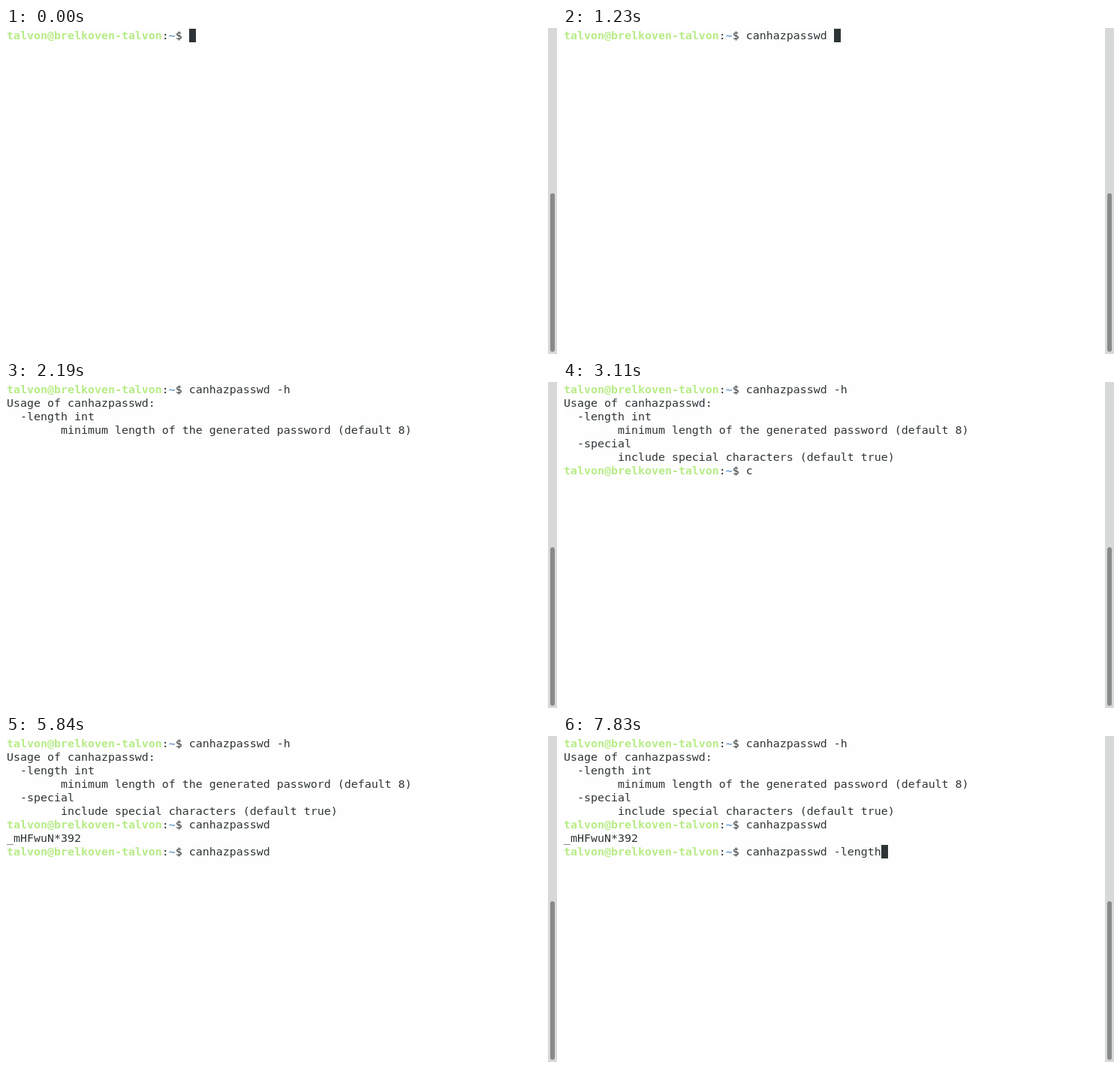
Animation, 734 px wide and 434 px high, one loop 8 s. Source, as an HTML page:

```html
<!DOCTYPE html>
<html lang="en">
<head>
<meta charset="utf-8">
<title>Terminal session</title>
<style>
  html, body { margin: 0; width: 100%; height: 100%; overflow: hidden; background: #fefefe; }
  svg { display: block; }
  text {
    font-family: "DejaVu Sans Mono", monospace;
    font-size: 14.95px;
    fill: #2e3436;
    white-space: pre;
  }
  .user, .path { font-weight: bold; }
  .user { fill: #b7ec86; }
  .path { fill: #729fcf; }
</style>
</head>
<body>
<svg width="734" height="434" viewBox="0 0 734 434">
  <rect width="734" height="434" fill="#fefefe"/>
  <rect x="722" width="12" height="434" fill="#d6d9d7"/>
  <rect x="725" y="220" width="6" height="211" rx="3" fill="#888a89"/>
  <rect id="cursor" width="9" height="18" fill="#2e3436"/>
  <g id="screen"></g>
</svg>
<script>
const LOOP = 8000;
const CELL = { left: 1, top: 1, width: 9, height: 18, ascent: 14 };
const USER = 'talvon@brelkoven-talvon';
const PROMPT_LENGTH = USER.length + 4;
const CURSOR_OFF = 2190, CURSOR_ON = 6910;

// Each key is [time, number of characters shown].
const command = (text, ...keys) => ({ text, keys, prompt: true });
const output = (text, time) => ({ text, keys: [[time, text.length]] });

const lines = [
  command('canhazpasswd -h', [0, 0], [500, 1], [730, 2], [790, 3], [980, 4], [1060, 5],
    [1230, 13], [1870, 14], [1990, 15]),
  { text: 'Usage of canhazpasswd:', keys: [[2130, 0], [2190, 22]] },
  output('  -length int', 2190),
  output('        minimum length of the generated password (default 8)', 2190),
  output('  -special', 3110),
  output('        include special characters (default true)', 3110),
  command('canhazpasswd', [3110, 1], [3350, 2], [3410, 3], [4270, 5], [4310, 12]),
  output('_mHFwuN*392', 4740),
  command('canhazpasswd -length', [5840, 13], [6910, 14], [7170, 15], [7310, 16],
    [7470, 17], [7570, 18], [7750, 19], [7830, 20])
];

const screen = document.getElementById('screen');
const cursor = document.getElementById('cursor');

function append(parent, tag, content = '', className) {
  const node = document.createElementNS('http://www.w3.org/2000/svg', tag);
  node.textContent = content;
  if (className) node.setAttribute('class', className);
  return parent.appendChild(node);
}

lines.forEach((line, row) => {
  line.node = append(screen, 'text');
  line.node.setAttribute('x', CELL.left);
  line.node.setAttribute('y', CELL.top + row * CELL.height + CELL.ascent);
  if (line.prompt) {
    append(line.node, 'tspan', USER, 'user');
    append(line.node, 'tspan', ':');
    append(line.node, 'tspan', '~', 'path');
    append(line.node, 'tspan', '$ ');
  }
  line.typed = append(line.node, 'tspan');
});

function render(time) {
  let row = 0, column = 0;
  lines.forEach((line, index) => {
    const key = line.keys.filter(([start]) => start <= time).pop();
    line.node.setAttribute('visibility', key ? 'visible' : 'hidden');
    if (!key) return;
    line.typed.textContent = line.text.slice(0, key[1]);
    row = index;
    column = key[1] + (line.prompt ? PROMPT_LENGTH : 0);
  });
  cursor.setAttribute('x', CELL.left + column * CELL.width);
  cursor.setAttribute('y', CELL.top + row * CELL.height);
  const shown = time < CURSOR_OFF || time >= CURSOR_ON;
  cursor.setAttribute('visibility', shown ? 'visible' : 'hidden');
}

const start = performance.now();
function tick() {
  render((performance.now() - start) % LOOP);
  requestAnimationFrame(tick);
}
tick();
</script>
</body>
</html>
```
